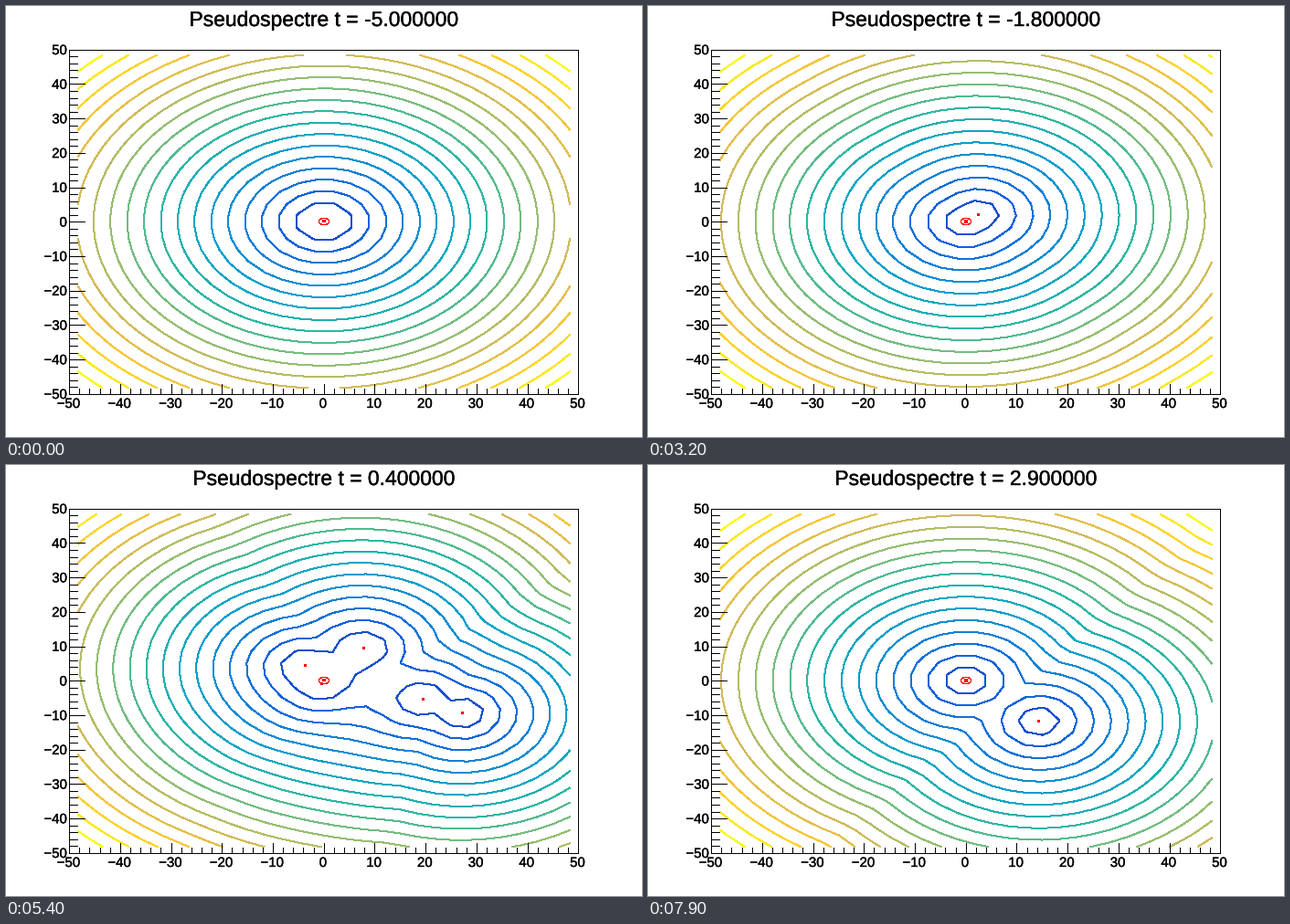
Write a matplotlib script that moves like this. It is 696 px wide and 472 px high and loops after 8 s.

```python
import numpy as np
import matplotlib.pyplot as plt
from matplotlib.animation import FuncAnimation
from matplotlib.colors import LinearSegmentedColormap
from matplotlib.patches import Ellipse, Rectangle
from matplotlib.patheffects import withStroke

W, H = 696, 472
FRAMES, INTERVAL = 80, 100
LEFT, RIGHT, TOP, BOTTOM = 69.5, 626.5, 47.5, 424.5
SX, SY = (RIGHT - LEFT) / 100, (BOTTOM - TOP) / 100
FONT = "Liberation Sans"
BINS, LEVELS = 30, 20

BIRD = LinearSegmentedColormap.from_list("bird", list(zip(
    [0.2082, 0.0592, 0.0780, 0.0232, 0.1802, 0.5301, 0.8186, 0.9956, 0.9764],
    [0.1664, 0.3599, 0.5041, 0.6419, 0.7178, 0.7492, 0.7328, 0.7862, 0.9832],
    [0.5293, 0.8684, 0.8385, 0.7914, 0.6425, 0.4662, 0.3499, 0.1968, 0.0539])),
    N=255)
LINE_COLORS = [BIRD(int((i + 0.99) * 255 / LEVELS)) for i in range(1, LEVELS)]


def px(x):
    return LEFT + (x + 50) * SX


def py(y):
    return BOTTOM - (y + 50) * SY


def pulse(t, z, width=0.31, turn=123.2):
    """Brief swell around t = 0.17 that equals z at t = -0.1."""
    u = t + 0.1
    size = np.exp((0.27 ** 2 - (t - 0.17) ** 2) / width)
    angle = -np.radians(turn * u + 16.8 * u * u)
    return z * size * np.exp(1j * angle)


def leading(t):
    """Eigenvalue that grows like exp(t), overshoots and settles."""
    size = 18.6 * (1 + np.exp(-4 * t)) ** -0.25
    size += 13.1 * np.exp(-(t - 0.15) ** 2 / 0.35)
    angle = np.radians(0.5 - 40 * np.tanh(1.8 * (t - 0.1)))
    return size * np.exp(1j * angle)


def blocks(t):
    """2x2 triangular blocks [[big, couple], [0, small]] of the matrix."""
    swell = abs(pulse(t, 1))
    big = [leading(t),
           pulse(t, 12.1 + 14.5j),
           pulse(t, -5 + 10j, 0.22),
           pulse(t, -5 - 1.5j, 0.22)]
    small = [0.12, -0.12, 0, pulse(t, 0.6 - 0.7j)]
    couple = [4 * np.exp(-(t - 0.15) ** 2 / 0.7),
              9 * swell, 7 * swell, 4 * swell]
    return big, small, couple


centers = -50 + (np.arange(BINS) + 0.5) * 100 / BINS
GX, GY = np.meshgrid(centers, centers)
GZ = GX + 1j * GY


def smallest_singular(big, small, couple):
    parts = []
    for p, q, c in zip(big, small, couple):
        a, b = abs(GZ - p), abs(GZ - q)
        parts.append((np.hypot(a + b, c) - np.hypot(a - b, c)) / 2)
    return np.min(parts, axis=0)


fig = plt.figure(figsize=(W / 72, H / 72), dpi=72, facecolor="white")
ax = fig.add_axes([0, 0, 1, 1])
ax.set_xlim(0, W)
ax.set_ylim(H, 0)
ax.axis("off")


def line(xs, ys):
    # The small shift makes snapping pick the pixel that holds the point.
    ax.plot(np.array(xs) - 0.3, np.array(ys) + 0.3, color="black", lw=1,
            antialiased=False, zorder=3)


def label(x, y, text, size, ha):
    return ax.text(x, y, text, fontsize=size, family=FONT, ha=ha,
                   va="baseline", zorder=3,
                   path_effects=[withStroke(linewidth=0.35,
                                            foreground="black")])


line([LEFT, RIGHT, RIGHT, LEFT, LEFT], [TOP, TOP, BOTTOM, BOTTOM, TOP])
for v in range(-50, 51, 2):
    major = v % 10 == 0
    tx, ty = (11.3, 16.7) if major else (5.6, 8.4)
    line([px(v)] * 2, [BOTTOM, BOTTOM - tx])
    line([LEFT, LEFT + ty], [py(v)] * 2)
    if major:
        name = str(v).replace("-", "\u2212")
        label(px(v) - 1, 440, name, 15, "center")
        label(67, py(v) + 5.5, name, 15, "right")

title = label(348, 22, "", 22.9, "center")
ax.add_patch(Ellipse((px(0), py(0)), 2 * SX, 2 * SY, fill=False, ec="red",
                     lw=0.4, antialiased=False, zorder=4))
dots = [ax.add_patch(Rectangle((0, 0), 3, 3, fc="red", lw=0,
                               antialiased=False, zorder=5))
        for _ in range(8)]
drawn = []


def update(i):
    t = (i - 50) / 10
    title.set_text(f"Pseudospectre t = {t:.6f}")
    big, small, couple = blocks(t)
    for dot, z in zip(dots, np.array(big + small)):
        dot.set_xy((round(px(z.real) - 1.5), round(py(z.imag) - 1.5)))
    s = smallest_singular(big, small, couple)
    levels = np.linspace(s.min(), s.max(), LEVELS + 1)[1:-1]
    while drawn:
        drawn.pop().remove()
    # Without antialiasing a 1 px line covers two pixels.
    drawn.append(ax.contour(px(GX), py(GY), s, levels=levels,
                            colors=LINE_COLORS, linewidths=1,
                            antialiased=False, zorder=1))
    return []


anim = FuncAnimation(fig, update, frames=FRAMES, interval=INTERVAL,
                     init_func=lambda: [], repeat=True, repeat_delay=0,
                     blit=False)
plt.show()
```
